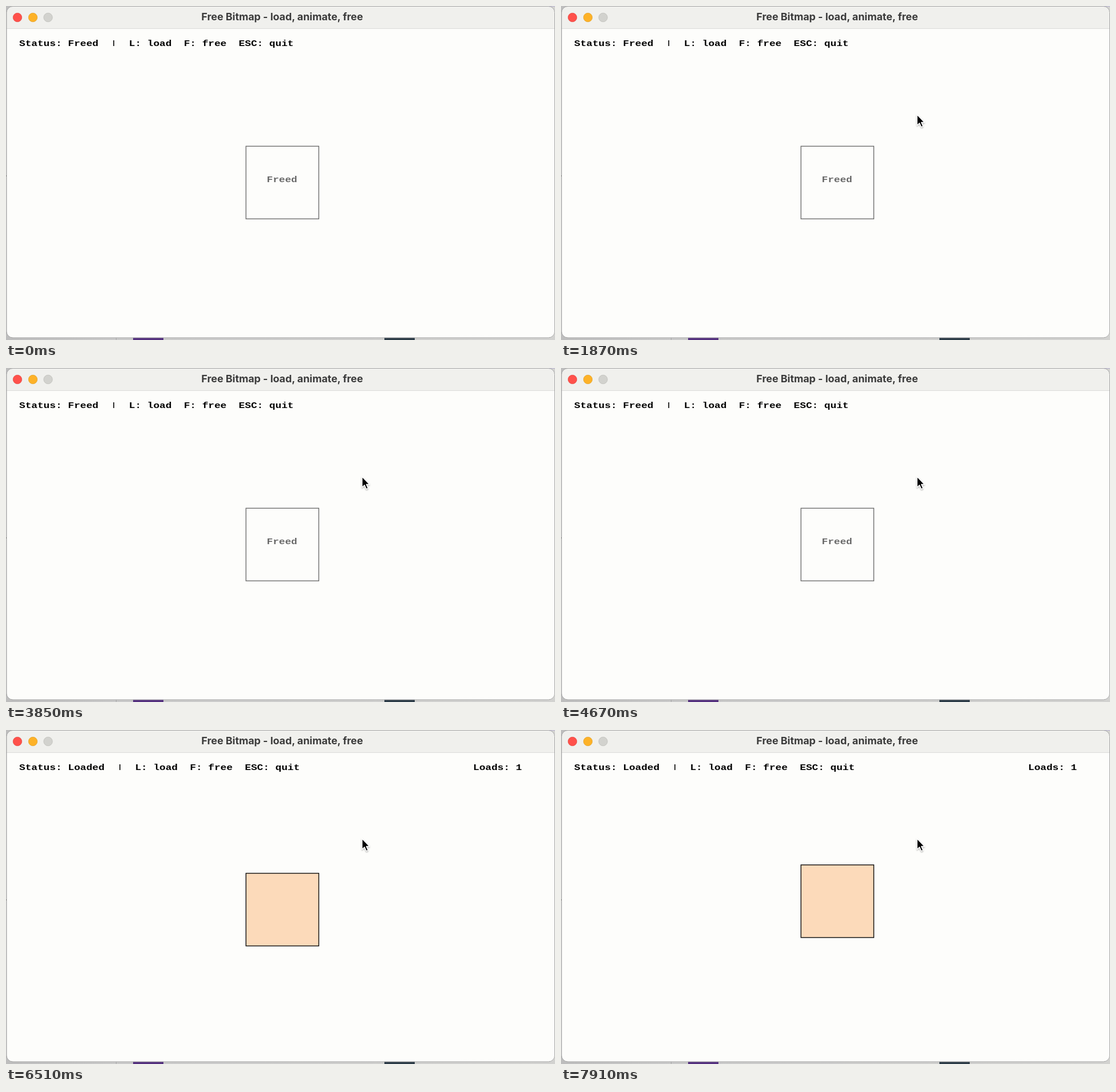
These frames come from a looping animation (959 px wide and 584 px high, 8 s). An HTML page:

```html
<!DOCTYPE html>
<html lang="en">
<head>
<meta charset="utf-8">
<title>Free Bitmap</title>
<style>
  html, body { margin: 0; width: 100%; height: 100%; overflow: hidden; background: #cbcbcb; }
  svg { display: block; width: 959px; height: 584px; }
  .title { font: 700 17.85px Inter, sans-serif; fill: #3b3b3b; text-anchor: middle; }
  .mono { font: 700 17.77px "Liberation Mono", monospace; }
  text { white-space: pre; }
  .bar { font-size: 12.5px; text-anchor: middle; }
  .freed, .loaded { animation: hide 8s step-end infinite; }
  .loaded { animation-name: show; }
  #cursor { animation: enter 8s linear infinite; }
  /* the bitmap is loaded at 5670 ms */
  @keyframes hide { 0% { visibility: visible } 70.87%, 100% { visibility: hidden } }
  @keyframes show { 0% { visibility: hidden } 70.87%, 100% { visibility: visible } }
  @keyframes enter {
    0%, 10.8% { transform: translate(970px, 600px); animation-timing-function: ease-out }
    12.6% { transform: translate(623px, 191px) }
    20%, 100% { transform: translate(622px, 190px) }
  }
</style>
</head>
<body>
<svg viewBox="0 0 959 584">
  <defs>
    <linearGradient id="desk" x2="1" y2="0">
      <stop stop-color="#bdbdbd"/><stop offset=".2" stop-color="#c9c9c9"/><stop offset="1" stop-color="#d2d2d0"/>
    </linearGradient>
    <filter id="shadow" x="-50%" y="-50%" width="200%" height="200%">
      <feDropShadow dx="0" dy="1.5" stdDeviation="1.2" flood-opacity=".35"/>
    </filter>
    <clipPath id="frame"><rect x="1" y="1" width="958" height="579" rx="11"/></clipPath>
  </defs>

  <rect width="959" height="584" fill="url(#desk)"/>
  <rect x="190" width="769" height="1" fill="#bbb5d0"/>
  <rect x="192" y="580" width="1" height="4" fill="#a8a8a8"/>
  <rect x="222" y="580" width="53" height="4" fill="#54307f"/>
  <rect x="661" y="580" width="53" height="4" fill="#2c3b47"/>
  <rect y="296" width="1" height="2" fill="#555"/>

  <g clip-path="url(#frame)">
    <rect width="959" height="584" fill="#fdfdfb"/>
    <rect width="959" height="39" fill="#f0f0ed"/>
    <rect y="39" width="959" height="1" fill="#dcdcda"/>
  </g>
  <rect x="1" y=".5" width="957.5" height="579.5" rx="11" fill="none" stroke="#a5a5a5"/>

  <circle cx="20" cy="20" r="7.7" fill="#ff514b" stroke="#e2463f" stroke-width=".7"/>
  <circle cx="47" cy="20" r="7.7" fill="#fdb228" stroke="#e09e24" stroke-width=".7"/>
  <circle cx="73.5" cy="20" r="7.7" fill="#d2d2ce" stroke="#bcbcb8" stroke-width=".7"/>
  <text class="title" x="482.5" y="25.3">Free Bitmap - load, animate, free</text>

  <g class="freed">
    <g class="mono" transform="translate(23 69.7) scale(1 .8)">
      <text>Status: Freed     L: load  F: free  ESC: quit</text>
      <text class="bar" x="165.3" y="-2">|</text>
    </g>
    <rect x="419.2" y="245.2" width="127.2" height="127" fill="none" stroke="#686868" stroke-width="1.33"/>
    <text class="mono" transform="translate(455.5 307.7) scale(1 .8)" fill="#686868">Freed</text>
  </g>

  <g class="loaded">
    <g class="mono" transform="translate(23 69.7) scale(1 .8)">
      <text>Status: Loaded     L: load  F: free  ESC: quit</text>
      <text class="bar" x="176" y="-2">|</text>
      <text x="793">Loads: 1</text>
    </g>
    <rect id="bitmap" x="419.2" y="245.2" width="127.2" height="127" fill="#fcdaba" stroke="#0c0c0c" stroke-width="1.4"/>
  </g>

  <g id="cursor">
    <path d="M0 0V18.6L4.3 14.7L7.4 21.6L10.4 20.3L7.4 13.5H13Z" fill="#000" stroke="#fff"
      stroke-width="1.3" stroke-linejoin="round" filter="url(#shadow)"/>
  </g>
</svg>
<script>
  const LOOP = 8000, PIXEL = 4 / 3;
  const bitmap = document.getElementById('bitmap');
  const clock = document.getElementById('cursor').getAnimations()[0];

  // The bitmap bobs on a cosine, snapped to whole pixels of the scaled-up screen.
  function bob(t) {
    const swing = 8 * Math.cos((t - 5489) * 0.001105);
    return PIXEL * Math.min(7, Math.round(swing));
  }

  function draw() {
    const t = (clock.currentTime ?? 0) % LOOP;
    bitmap.setAttribute('transform', `translate(0 ${bob(t)})`);
    requestAnimationFrame(draw);
  }
  draw();
</script>
</body>
</html>
```
